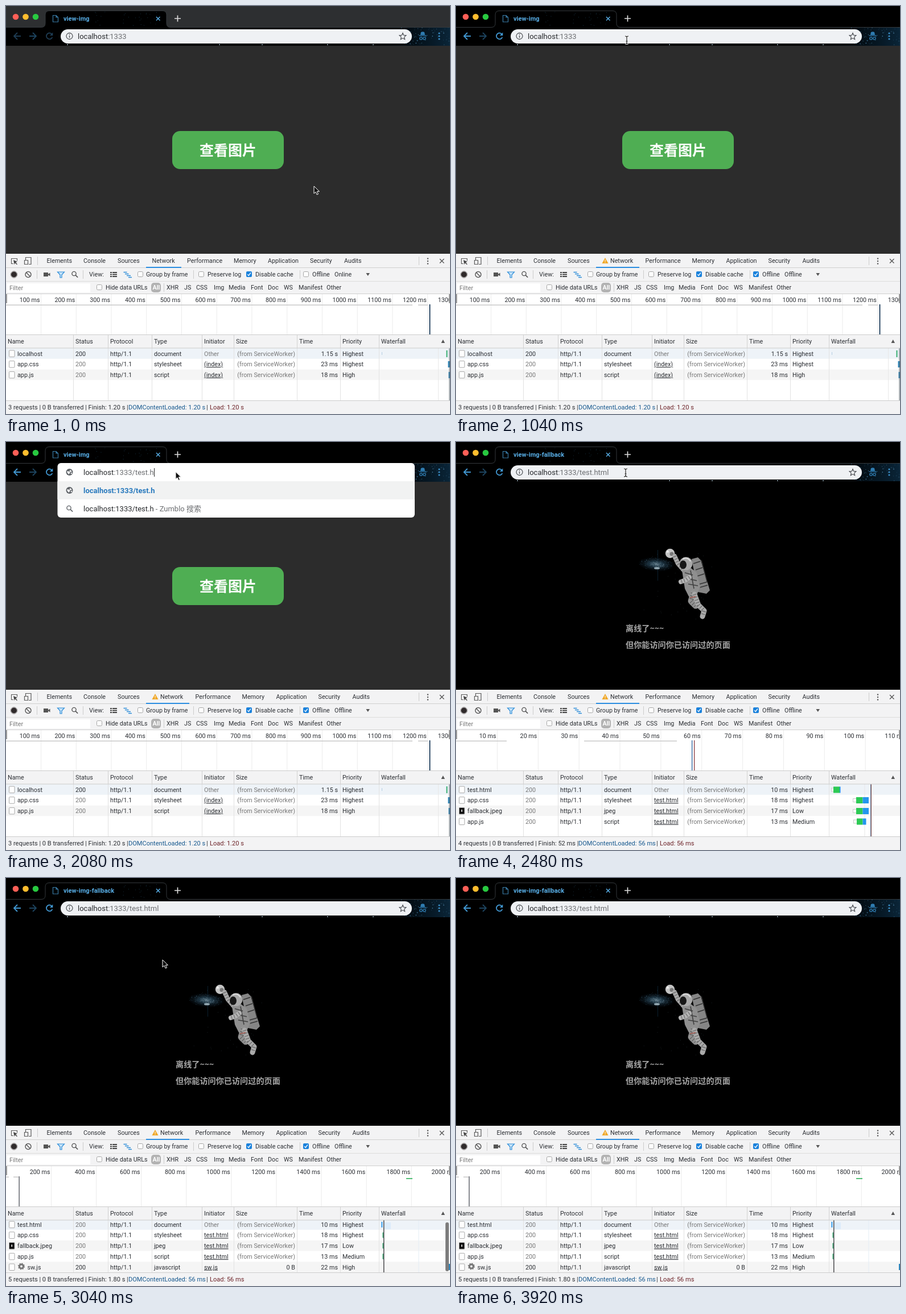
These frames come from a looping animation (780x718 px, 4000 ms). An HTML page:

```html
<!DOCTYPE html>
<html lang="zh-CN">
<head>
<meta charset="utf-8">
<title>view-img</title>
<style>
  html, body { margin: 0; width: 100%; height: 100%; overflow: hidden; background: #000; }
  svg { display: block; width: 780px; height: 718px; }
  text { font: 10.75px Roboto, "Noto Sans CJK SC", sans-serif; fill: #2b2e33; white-space: pre; }
  .dim { fill: #777; }
  .end { text-anchor: end; }
  .link { text-decoration: underline; }
  .sum { font-size: 11.05px; }
  .dom { fill: #17598f; }
  .load { fill: #6d2328; }
  .url { font-size: 13px; fill: #27292c; }
  .url .dim { fill: #6c6e71; }
  .hit { font-size: 13px; font-weight: 700; fill: #2879bd; }
  .tab { font-size: 11px; font-weight: 700; fill: #58aee6; }
  .cjk { font-family: "Noto Sans CJK SC", "Noto Sans CJK", sans-serif; font-weight: 700; }
  .big { font-size: 25px; fill: #fff; }
  .note { font-size: 14.15px; fill: #a6a6a6; }
  .pill { fill: #fff; font-weight: 700; }
</style>
</head>
<body>
<svg id="stage" viewBox="0 0 780 718"></svg>
<script>
const LOOP = 4000, STEP = 80;
const FOCUS = 480, OFFLINE = 480, CLICK = 1200, CARET = 1360, EDIT = 1440, TYPE = 1680, ENTER = 2400, LOADED = 2480, WORKER = 2960;

const txt = (x, y, s, cls = '') => `<text x="${x}" y="${y}" class="${cls}">${s}</text>`;
const box = (x, y, w, h, fill, more = '') => `<rect x="${x}" y="${y}" width="${w}" height="${h}" fill="${fill}" ${more}/>`;
const dot = (x, y, r, fill, more = '') => `<circle cx="${x}" cy="${y}" r="${r}" fill="${fill}" ${more}/>`;
const oval = (x, y, rx, ry, fill, more = '') => `<ellipse cx="${x}" cy="${y}" rx="${rx}" ry="${ry}" fill="${fill}" ${more}/>`;
const line = (d, color, w = 1, more = '') => `<path d="${d}" fill="none" stroke="${color}" stroke-width="${w}" ${more}/>`;
const area = (d, fill, more = '') => `<path d="${d}" fill="${fill}" ${more}/>`;
const group = (id, s) => `<g id="${id}">${s}</g>`;
const repeat = (n, f) => Array.from({ length: n }, (_, i) => f(i)).join('');
const vline = (x, y, h, color = '#ccc') => box(x, y, 1, h, color);

let seed = 7;
const rand = () => (seed = seed * 16807 % 2147483647) / 2147483647;

const lens = (x, y, c) => dot(x, y, 3.6, 'none', `stroke="${c}" stroke-width="1.4"`) + line(`M${x + 2.6} ${y + 2.6}l4 4`, c, 1.6);
const globe = (x, y) => dot(x, y, 6, '#5f6368') +
  area(`M${x - 4} ${y - 2}l4 1 1 2-2 3-3-3zM${x + 1} ${y - 4}l3 2-1 2-3-1zM${x + 2} ${y + 1}h3l-2 3z`, '#fff');
const check = (x, y) => box(x + .5, y + .5, 9, 9, '#fff', 'rx="2" stroke="#a5a5a5"');
const checked = (x, y) => box(x, y, 10, 10, '#1b82dc', 'rx="2"') + line(`M${x + 2.3} ${y + 5.2}l2 2.2 3.6-5`, '#fff', 1.4);

function chrome() {
  const stars = repeat(90, () => {
    const x = 780 - 90 * rand() ** 1.3, y = 38 + 31 * rand();
    return dot(x, y, .3 + .6 * rand(), '#4f86aa', `opacity="${.25 + .6 * rand()}"`);
  });
  const sparks = [108, 375, 450, 565, 645].map(x => dot(x, 68, 1, '#a9bcc9')).join('');
  const faint = repeat(30, () => dot(150 + 120 * rand(), 10 + 25 * rand(), .6, '#24506c', 'opacity=".6"'));
  const nav = c => line('M26 53H14M20 47l-6 6 6 6', c, 1.8);
  const reload = c => line('M81 50a5.4 5.4 0 1 0 .4 5', c, 1.8) + area('M82.300 46.500v5.500h-5.500z', c);
  return box(0, 0, 780, 70, '#000') +
    group('idle', box(0, 0, 780, 37, '#2d2f31')) +
    box(640, 38, 140, 32, 'url(#sky)') + stars +
    area('M62 37.500q7 0 7-7V15.500q0-7 7-7H275q7 0 7 7V30.500q0 7 7 7z', '#000') + faint + sparks +
    line('M0 37.500H62q7 0 7-7V15.500q0-7 7-7H275q7 0 7 7V30.500q0 7 7 7H780', '#34393d') +
    dot(17, 19, 5.3, '#ff5f57') + dot(34.500, 19, 5.3, '#ffbd2e') + dot(52, 19, 5.3, '#28c940') +
    line('M82.500 16.500h5.500l3.500 3.500v8h-9zM88 16.500v3.500h3.500', '#397ca8', 1.2) +
    `<text id="title" x="101" y="26" class="tab"></text>` +
    line('M264 19l6.500 6.500M270.500 19l-6.500 6.500', '#58aee6', 1.5) +
    line('M296 22h11M301.500 16.500v11', '#ddd', 1.7) +
    line('M41 53h12M47 47l6 6-6 6', '#1d445f', 1.8) +
    group('navOff', nav('#1e3c53') + reload('#1e3c53')) + group('navOn', nav('#4197d1') + reload('#4197d1')) +
    area('M728 51l1-5q3-1.500 6 0l1 5zM725.500 51.500h13v1.300h-13z', '#2f7cb1') +
    dot(729, 57, 2.2, 'none', 'stroke="#2f7cb1" stroke-width="1.3"') + dot(735, 57, 2.2, 'none', 'stroke="#2f7cb1" stroke-width="1.3"') +
    repeat(3, i => dot(761, 48 + 5 * i, 1.6, '#3b8fc8'));
}

function homePage() {
  return group('home', box(0, 70, 780, 366, '#2c2c2c') + box(292, 220, 196, 67, '#4fae53', 'rx="14"') +
    txt(340, 262.500, '查看图片', 'cjk big'));
}

function offlinePage() {
  const dust = repeat(40, () => dot(330 + 120 * rand(), 195 + 120 * rand(), .5, '#48606d', 'opacity=".45"'));
  const galaxy = repeat(130, () => {
    const a = 6.283 * rand(), r = rand() ** .7;
    return dot(352 + 30 * r * Math.cos(a), 215 + 11 * r * Math.sin(a) + 2 * r * Math.cos(a), .5, r < .5 ? '#9fb4c0' : '#3d6076', 'opacity=".6"');
  });
  // a sleeve of the suit, with dark creases across it
  const limb = (d, w, c) => line(d, c, w, 'stroke-linecap="round" stroke-linejoin="round"') +
    line(d, '#3c3c3c', w * .8, 'stroke-dasharray="1.200 3.800" opacity=".6"');
  return group('offline', box(0, 69, 780, 367, '#000') + dust +
    box(354, 190, 1, 54, '#0a1f2e') +
    oval(352, 215, 31, 12, 'url(#galaxy)', 'transform="rotate(4 352 215)"') + galaxy +
    oval(353, 222, 5, 2, '#c5dbe5', 'opacity=".7"') +
    dot(376, 196, 8.2, '#c4c4c4') + dot(379, 197, 3.5, '#777') + dot(372, 193, 2, '#eee') +
    area('M414 206l11-3 5 5 16 53-6 6-15-3z', '#858585') +
    line('M417 214l12-4M421 225l12-4M424 236l12-4M428 250l14-4M428 256l14-4M431 208l10 38', '#333', 1.4) +
    limb('M384 201l6 13 12 14', 8, '#aaa') +
    area('M397 226l16-4 10 8 6 25-6 14-14 3-7-14z', '#8f8f8f') +
    line('M402 230l14 4M405 240l18 4M408 250l17 3M412 226l6 32', '#404040', 1.6) +
    limb('M410 238l-7 5-8 3', 8, '#b4b4b4') +
    limb('M417 266l-4 14 8 8', 11, '#929292') + limb('M419 268l7 19 10 10-3 10', 9, '#aaa') +
    dot(404, 214, 11.5, '#a9a9a9') + line('M398 206q8-5 14 4', '#ddd', 2) + oval(399, 216, 6, 7.5, '#181818') +
    line('M411 274l10-2', '#9f5148', 1.3) +
    txt(298, 333, '离线了~~~', 'cjk note') + txt(298, 361.500, '但你能访问你已访问过的页面', 'cjk note'));
}

function addressBar() {
  const star = 'M697 47.500l1.700 3.900 4.200.400-3.200 2.800.900 4.200-3.600-2.200-3.600 2.200.900-4.200-3.200-2.800 4.200-.400z';
  return group('barGrey', box(96, 41, 617, 25, '#eff1f4', 'rx="12.500"') + line(star, '#4d5055', 1.2)) +
    group('barWhite', box(96, 41, 617, 25, '#fff', 'rx="12.500"')) +
    group('drop', box(90.500, 37, 627.500, 96, '#fff', 'rx="6"') + box(90.500, 69, 627.500, 32, '#f1f2f2') +
      globe(111.500, 85) + lens(110.500, 116, '#5f6368') +
      `<text id="hit" x="136" y="89.500" class="hit"></text><text id="query" x="136" y="121.500" class="url"></text>`) +
    group('info', dot(111.500, 53, 5.5, 'none', 'stroke="#55585c" stroke-width="1.3"') + box(110.800, 52, 1.4, 4, '#55585c') + box(110.800, 49.500, 1.4, 1.5, '#55585c')) +
    group('globe', globe(111.500, 53)) +
    group('select', box(126, 45, 87, 17, '#b4d5fe')) +
    `<text id="url" y="57.500" class="url"></text>` +
    `<rect id="caret" y="46" width="1" height="15" fill="#222"/>`;
}

function toolbars() {
  const tabs = [[318, 'Performance'], [400, 'Memory'], [460, 'Application'], [534, 'Security'], [594, 'Audits']];
  const kinds = [[282, 'XHR'], [313, 'JS'], [334, 'CSS'], [365, 'Img'], [391, 'Media'], [430, 'Font'], [460, 'Doc'], [488, 'WS'], [514, 'Manifest'], [563, 'Other']];
  const put = y => ([x, s]) => txt(x, y, s);
  return box(0, 436, 780, 71, '#f3f3f4') + box(0, 460, 780, 1, '#cfcfcf') + box(0, 484, 780, 1, '#dcdcdc') + box(0, 506, 780, 1, '#cfcfcf') +
    line('M13 453.500H9.500v-9h10v4', '#5a5a5a', 1.1) + area('M13 447l7 3-3 1.200 3 3-1 1-3-3-1.200 3z', '#444') +
    line('M34.500 447v-4.500h9.500v12h-4M32.500 447.500h6v7h-6z', '#5a5a5a', 1.2) + vline(55, 441, 15) +
    txt(71.500, 452, 'Elements') + txt(136, 452, 'Console') + txt(196, 452, 'Sources') +
    group('shift', txt(256.500, 452, 'Network') + tabs.map(put(452)).join('')) +
    group('warn', area('M262 443l5.500 10h-11z', '#f0a828') + box(261.500, 446.500, 1, 3.5, '#fff') + box(261.500, 451, 1, 1, '#fff')) +
    `<rect id="under" x="246" y="459" height="2" fill="#2a8de0"/>` +
    vline(725, 441, 15) + repeat(3, i => dot(741, 444.500 + 4.5 * i, 1.2, '#555')) + line('M762 445l7.500 7.500M769.500 445l-7.500 7.500', '#555', 1.3) +
    dot(14, 472.500, 5, '#2f2a2b') + dot(14, 472.500, 5.8, 'none', 'stroke="#6a6465" stroke-width=".8"') +
    dot(39, 472.500, 5, 'none', 'stroke="#555" stroke-width="1.4"') + line('M35.500 469l7 7', '#555', 1.4) + vline(54, 465, 15) +
    box(66, 469, 8, 7, '#555') + area('M73 472.500l4.500-3v6z', '#555') +
    area('M90.500 468h12l-4.500 5v5h-3v-5z', '#cbe5f8') + line('M90.500 468h12l-4.500 5v5h-3v-5z', '#2b8cd8', 1.2) +
    lens(119.500, 471, '#555') + vline(135, 465, 15) + txt(146, 476, 'View:') +
    repeat(3, i => box(183, 468 + 3.5 * i, 3, 2, '#444') + box(187, 468 + 3.5 * i, 8, 2, '#444')) +
    line('M206.500 468.500h6M209 471.500h6.500M212 474.500h7M215 477.500h6', '#2b8cd8', 1.6) +
    check(231, 467) + txt(246, 476, 'Group by frame') + vline(329, 465, 15) +
    check(338, 467) + txt(354, 476, 'Preserve log') + checked(422, 467) + txt(438, 476, 'Disable cache') + vline(516, 465, 15) +
    check(522, 467) + group('tick', checked(522, 467)) + txt(538, 476, 'Offline') +
    `<text id="mode" x="577" y="476"></text>` + area('M632.500 470h6.500l-3.250 5z', '#555') +
    box(2, 488, 146, 16, '#fff') + txt(6, 500, 'Filter', 'dim') + check(159, 490) + txt(175, 499, 'Hide data URLs') +
    box(255, 487, 17, 17, '#b3b3b3', 'rx="5"') + txt(257.500, 499, 'All', 'pill') + vline(277, 488, 15) + kinds.map(put(499)).join('');
}

function network(id, v) {
  const cols = [[118, 'Status'], [179, 'Protocol'], [256, 'Type'], [344, 'Initiator'], [400, 'Size'], [511, 'Time'], [587, 'Priority'], [655, 'Waterfall']];
  const scale = repeat(13, i => {
    const x = v.first + i * v.gap;
    return vline(x, 507, 71, '#ececec') + txt(x - 1.5, 521, (i + 1) * v.unit + ' ms', 'end');
  });
  const row = ([name, type, by, time, level, strong, size], i) => {
    const y = v.top + i * 18.7, base = y + 4, sw = name === 'sw.js', jpg = type === 'jpeg';
    const icon = box(5.500, y - 5.5, 9.5, 11.5, jpg ? '#0c0c0c' : '#fff', 'rx="1" stroke="#a8a8a8"') + (jpg ? box(9.2, y - 2, 2, 4, '#ccc') : '');
    const gear = sw ? dot(27, y - 1, 3.5, 'none', 'stroke="#777" stroke-width="3"') + dot(27, y - 1, 5.3, 'none', 'stroke="#777" stroke-width="1.500" stroke-dasharray="2 2.160"') : '';
    return box(0, y - 9.3, 780, 18.7, i ? i % 2 ? '#fff' : '#f5f5f5' : '#eef3f8') + icon + gear +
      txt(sw ? 37.5 : 20, base, name) + txt(122, base, '200', strong ? '' : 'dim') + txt(183, base, 'http/1.1') + txt(260, base, type) +
      txt(348, base, by, by === 'Other' ? 'dim' : 'link') +
      txt(508, base, size || '(from ServiceWorker)', size ? 'end' : 'dim end') +
      txt(583, base, time, 'end') + txt(591, base, level);
  };
  const [sum, dom, load] = v.sum;
  return group(id, box(0, 507, 780, 211, '#fff') + scale + v.spans.map(([x, w]) => box(x, 525.500, w, 1.5, '#c9c9c9')).join('') + v.marks +
    box(0, 507, 2, 16, '#999') + box(778, 507, 2, 16, '#999') +
    v.rows.map(row).join('') + cols.map(([x]) => vline(x, 602, 92, '#e2e2e2')).join('') + v.bars +
    box(0, 578, 780, 24, '#f3f3f4') + box(0, 578, 780, 1, '#ccc') + box(0, 601.500, 780, 1, '#ccc') +
    txt(3, 594, 'Name') + cols.map(([x, s]) => vline(x, 579, 23, '#d2d2d2') + txt(x + 4, 594, s)).join('') + area('M764.500 593h6.500l-3.250-6z', '#555') +
    box(0, 694, 780, 24, '#f3f3f4') + box(0, 694, 780, 1, '#ccc') +
    txt(4, 710, sum, 'sum') + txt(215, 710, 'DOMContentLoaded: ' + dom, 'sum dom') + txt(352, 710, '|', 'sum') + txt(358, 710, 'Load: ' + load, 'sum load'));
}

const GREEN = '#2dca55', BLUE = '#2496ed';
const bar = (y, x, a, b, c) => box(x + .5, y - 2.5, a - x, 6, '#fff', 'stroke="#ccc"') + box(a, y - 5, b - a, 11, GREEN) + box(b, y - 5, c - b, 11, BLUE);
const loaded = [
  ['test.html', 'document', 'Other', '10 ms', 'Highest'], ['app.css', 'stylesheet', 'test.html', '18 ms', 'Highest'],
  ['fallback.jpeg', 'jpeg', 'test.html', '17 ms', 'Low'], ['app.js', 'script', 'test.html', '13 ms', 'Medium']];
loaded[0][2] = 'Other';

const logs = {
  netHome: {
    first: 61, gap: 61.75, unit: 100, top: 611.5, spans: [[0, 714], [724, 17]],
    marks: box(743.500, 525, 2, 53, '#2c4a66'),
    rows: [['localhost', 'document', 'Other', '1.15 s', 'Highest', true], ['app.css', 'stylesheet', '(index)', '23 ms', 'Highest'], ['app.js', 'script', '(index)', '18 ms', 'High']],
    bars: vline(759, 602, 92, '#e8e8e8') + box(660, 609, 1, 5, '#b5cfe3') + box(773.500, 606, 2, 12, '#37ad72') +
      box(776.500, 625, 3.5, 11, '#2b86bd') + box(777.500, 644, 2.5, 11, '#2b86bd') + vline(778.500, 602, 92, '#5c6870'),
    sum: ['3 requests | 0 B transferred | Finish: 1.20 s |', '1.20 s', '1.20 s']
  },
  netLoad: {
    first: 72, gap: 71.85, unit: 10, top: 611.5, spans: [[0, 89], [225, 163]],
    marks: box(414, 525, 1.3, 53, '#28609c') + box(418, 525, 1.3, 53, '#8b3c42'),
    rows: loaded,
    bars: vline(717.500, 602, 92, '#e8e8e8') + bar(611.5, 659, 663, 674, 675.5) + bar(630, 697, 703, 714.5, 725) + bar(649, 697, 703, 714.5, 725) +
      bar(667.5, 698, 704, 714.5, 720.5) + box(728, 602, 1, 92, '#62799a') + box(729, 602, 1, 92, '#8b5a55'),
    sum: ['4 requests | 0 B transferred | Finish: 52 ms |', '56 ms', '56 ms']
  },
  netDone: {
    first: 79, gap: 79.1, unit: 200, top: 609.7, spans: [[0, 5], [13, 9]],
    marks: box(22.500, 525, 1.3, 53, '#4d4f58') + box(703, 528, 11, 1.8, '#43b96a'),
    rows: [...loaded, ['sw.js', 'javascript', 'sw.js', '22 ms', 'High', true, '0 B']],
    bars: vline(724.500, 602, 92, '#e3edf5') + box(665, 606, 11, 12, '#ddecfa') + box(659.500, 605, 1.8, 10, BLUE) +
      repeat(3, i => box(661.500, 623.500 + 18.7 * i, 2, 10, '#3da873', 'rx="1"')) + box(663, 602, 1.5, 92, '#4b4b4f') + box(778, 679, 2, 11, '#2b86bd'),
    sum: ['5 requests | 0 B transferred | Finish: 1.80 s |', '56 ms', '56 ms']
  }
};

const stage = document.getElementById('stage');
stage.innerHTML = `<defs>
  <linearGradient id="sky"><stop offset="0" stop-color="#04121d" stop-opacity="0"/><stop offset="1" stop-color="#0a2538"/></linearGradient>
  <radialGradient id="galaxy"><stop offset="0" stop-color="#4d6877"/><stop offset=".4" stop-color="#1d3442"/><stop offset="1" stop-color="#050e15" stop-opacity=".2"/></radialGradient>
  </defs>` + chrome() + homePage() + offlinePage() + addressBar() + toolbars() +
  Object.entries(logs).map(([id, v]) => network(id, v)).join('') +
  group('thumb', box(772, 606, 6, 86, '#7d7d7d', 'rx="3"')) +
  group('arrow', area('M0 0v13l3-2.800 2.200 4.800 2.300-1-2.100-4.700h4.100z', '#111', 'stroke="#fff" stroke-linejoin="round"')) +
  group('beam', ['#fff', '#222'].map((c, i) => line('M-3-7q3 0 3 2V5q0 2-3 2M3-7q-3 0-3 2V5q0 2 3 2M-1.500 2h3', c, i ? 1.2 : 2.6)).join(''));

const el = {};
stage.querySelectorAll('[id]').forEach(e => el[e.id] = e);
// the galaxy gradient and the page groups have ids of their own
const show = (id, on) => el[id].setAttribute('visibility', on ? 'visible' : 'hidden');
const set = (id, s) => { if (el[id].innerHTML !== s) el[id].innerHTML = s; };

// time, x, y of the pointer
const route = [[0, 541, 317], [160, 541, 317], [400, 526, 470], [560, 526, 470], [960, 300, 60], [1040, 300, 60],
  [1200, 298, 54], [2800, 298, 54], [3360, 239.5, 282.5], [3440, 236, 287], [3680, -20, 330], [LOOP, -20, 330]];

function pointer(t) {
  const i = route.findIndex(p => p[0] > t), [t0, x0, y0] = route[i - 1], [t1, x1, y1] = route[i];
  const u = (t - t0) / (t1 - t0), k = u * u * (3 - 2 * u);
  return [x0 + (x1 - x0) * k, y0 + (y1 - y0) * k];
}

function render(t) {
  const off = t >= OFFLINE, done = t >= LOADED, worker = t >= WORKER;
  const focus = t >= CLICK && t < ENTER, edit = t >= EDIT && t < ENTER, drop = t >= TYPE && t < ENTER;

  show('idle', t < FOCUS); show('navOff', t < FOCUS); show('navOn', t >= FOCUS);
  show('home', !done); show('offline', done);
  show('netHome', !done); show('netLoad', done && !worker); show('netDone', worker);
  set('title', done ? 'view-img-fallback' : 'view-img');

  show('warn', off); show('tick', off);
  set('mode', off ? 'Offline' : 'Online');
  el.shift.setAttribute('transform', `translate(${off ? 14.5 : 0} 0)`);
  el.under.setAttribute('width', off ? 76 : 62);

  const count = Math.max(0, Math.floor((t - TYPE) / STEP) + 1);
  const tail = t < EDIT ? '' : '/' + 'test.html'.slice(0, count);
  const full = 'localhost:1333' + tail;
  show('barGrey', !focus); show('barWhite', focus && !drop); show('drop', drop);
  show('info', !edit); show('globe', edit); show('select', focus && t < CARET);
  set('url', `localhost<tspan class="dim">:1333${tail}</tspan>`);
  el.url.setAttribute('x', edit ? 136 : 126);
  set('hit', full);
  set('query', `${full}<tspan class="dim"> - Zumblo 搜索</tspan>`);
  show('caret', focus && t >= CARET);
  el.caret.setAttribute('x', (edit ? 136 : 126) + el.url.getComputedTextLength() + .5);

  show('thumb', worker);
  el.thumb.setAttribute('opacity', Math.max(0, Math.min(1, (3600 - t) / 160)));

  const [x, y] = pointer(t), beam = y < 68 && !drop;
  show('beam', beam); show('arrow', !beam);
  el[beam ? 'beam' : 'arrow'].setAttribute('transform', `translate(${x} ${drop ? y - 1.5 : y})`);
}

let start, last = -1;
function tick(now) {
  start ??= now;
  const t = Math.floor((now - start) % LOOP / STEP) * STEP;
  if (t !== last) render(last = t);
  requestAnimationFrame(tick);
}
render(0);
requestAnimationFrame(tick);
</script>
</body>
</html>
```
